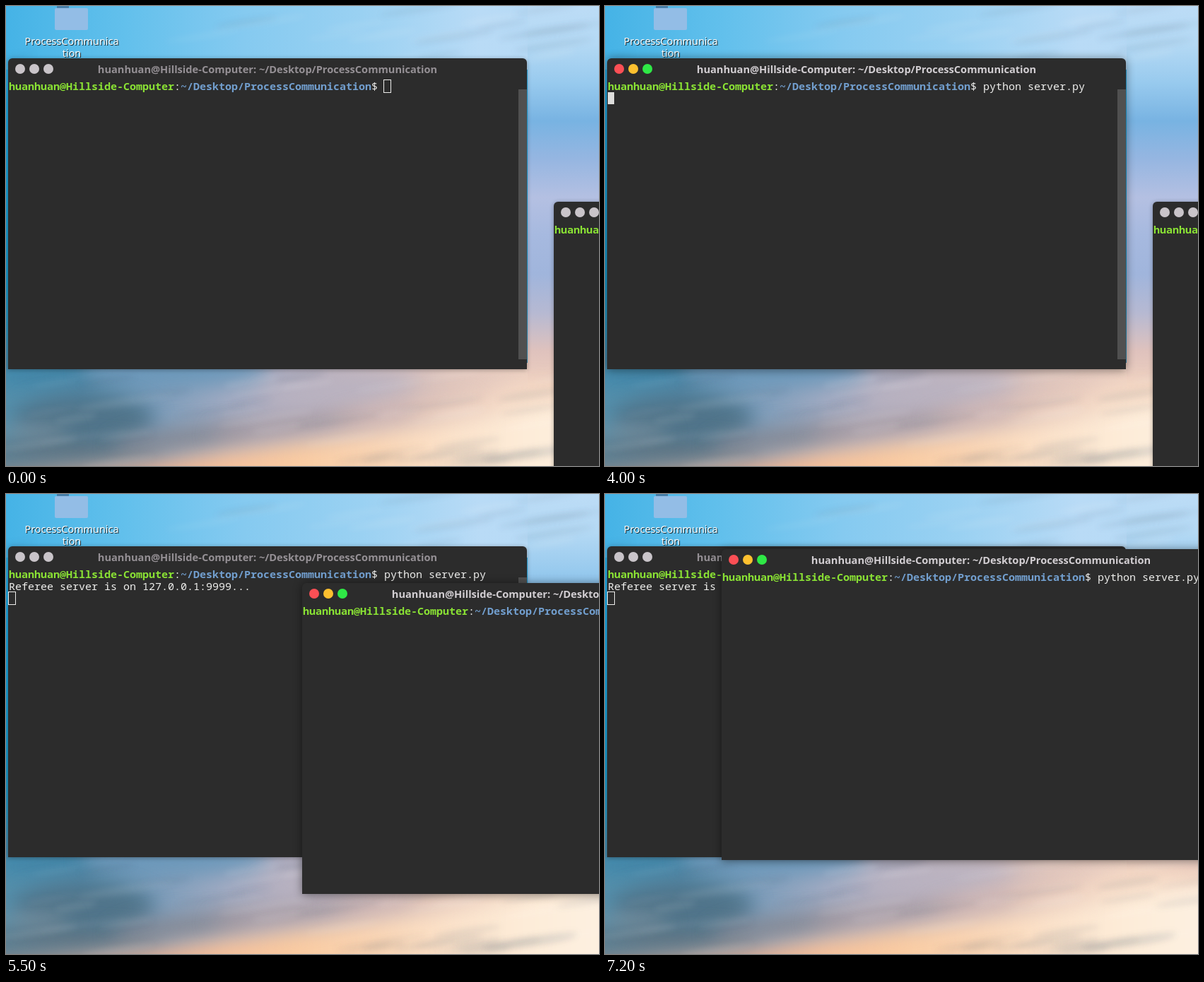
An HTML page with a canvas for the animation above (8 s loop, 839 px wide and 651 px high).

```html
<!DOCTYPE html>
<html lang="en">
<head>
<meta charset="utf-8">
<title>Two terminals</title>
<style>
html, body { margin: 0; height: 100%; overflow: hidden; }
canvas { display: block; }
</style>
</head>
<body>
<canvas id="stage" width="839" height="651"></canvas>
<script>
const W = 839, H = 651, LOOP = 8000;
const CELL = 9, LINE = 17, WIN_W = 734, WIN_H = 440;
const USER = 'huanhuan@Hillside-Computer', FOLDER = '~/Desktop/ProcessCommunication';
const COMMAND = 'python server.py', OUTPUT = 'Referee server is on 127.0.0.1:9999...';
const WHITE = '#eeeeec';
const ctx = document.getElementById('stage').getContext('2d');
const wallpaper = paintWallpaper();

function paintWallpaper() {
  const canvas = document.createElement('canvas');
  canvas.width = W;
  canvas.height = H;
  const g = canvas.getContext('2d');

  function gradient(x, y, colors) {
    const fill = g.createLinearGradient(0, 0, x, y);
    colors.split(' ').forEach((c, i, all) => fill.addColorStop(i / (all.length - 1), c));
    return fill;
  }
  function blob(x, y, rx, ry, color, tilt = 0) {
    g.fillStyle = color;
    g.beginPath();
    g.ellipse(x, y, rx, ry, tilt, 0, 7);
    g.fill();
  }

  // sky: left edge, top strip, right side
  g.fillStyle = gradient(0, H, '#3db4e6 #22a6de #1ba0d6 #1a98c8 #3f90b2 #6a8c9e');
  g.fillRect(0, 0, W, H);
  g.fillStyle = gradient(W, 0, '#45b3e6 #62c0ec #85caf0 #9ad1f2 #b9dbf6 #b4d9f5');
  g.fillRect(0, 0, W, 90);
  g.fillStyle = gradient(0, H,
    '#bcdcf6 #b4d9f4 #98caee #78b3e2 #96b6e1 #b4c0e2 #a6b9df #a0b5dc #b6b9d2 #dfc2bd #f0d2c0 #f8deca #fdeedb');
  g.fillRect(738, 0, W - 738, H);

  // clouds
  g.fillStyle = gradient(W, 0, '#5590ac #5189a8 #7a9cba #a2abc2 #b5b0c0 #c9b9be #e0c6bd #ecd0c2 #f6dcca');
  g.fillRect(0, 505, 738, H);
  g.filter = 'blur(14px)';
  blob(20, 510, 90, 30, '#4489ab');
  blob(240, 515, 130, 25, '#6c98ba');
  blob(110, 585, 100, 34, '#50748a');
  blob(40, 605, 50, 9, '#8598a4');
  blob(90, 630, 130, 14, '#5f707d');
  blob(250, 612, 100, 16, '#878a95', -.12);
  blob(400, 592, 110, 15, '#a99ca3', -.14);
  blob(470, 545, 110, 18, '#b9b2c0', -.12);
  blob(560, 575, 100, 12, '#cfb4b0', -.14);
  blob(680, 565, 110, 14, '#f2d5c3', -.1);
  blob(760, 560, 70, 26, '#f5dac6');

  // sunlit underside
  g.fillStyle = gradient(W, 0, '#8c7c78 #bd9c8e #e8b092 #f6c19a #f9cba2 #fad5b4 #fbe2ca #fdecd8 #fdf0e0');
  g.beginPath();
  g.moveTo(-30, 655);
  g.lineTo(200, 645);
  g.lineTo(300, 631);
  g.lineTo(420, 616);
  g.lineTo(520, 603);
  g.lineTo(620, 588);
  g.lineTo(720, 570);
  g.lineTo(870, 550);
  g.lineTo(870, 690);
  g.lineTo(-30, 690);
  g.fill();

  // soft brush strokes
  let seed = 7;
  const random = () => (seed = seed * 16807 % 2147483647) / 2147483647;
  g.filter = 'blur(4px)';
  for (let i = 0; i < 70; i++) {
    const x = random() * W, y = i < 20 ? random() * 80 : 520 + random() * 130;
    blob(x, y, 30 + random() * 40, 2 + random() * 4, i % 2 ? '#ffffff18' : '#30486016', -.15);
  }
  g.filter = 'none';

  // desktop folder
  g.fillStyle = '#477fa9';
  g.fillRect(72, 0, 17, 3);
  g.fillStyle = '#93bde6';
  g.beginPath();
  g.roundRect(69, 3, 47, 31, 2);
  g.fill();
  g.font = '14.4px "Noto Sans", sans-serif';
  g.textAlign = 'center';
  [['#000c', 1], ['#fff', 0]].forEach(([color, d]) => {
    g.fillStyle = color;
    g.fillText('ProcessCommunica', 93 + d, 55 + d);
    g.fillText('tion', 93 + d, 72 + d);
  });
  return canvas;
}

function monoText(str, x, y, color, weight = 400) {
  ctx.font = weight + ' 15px "Noto Sans Mono", monospace';
  ctx.textAlign = 'left';
  ctx.fillStyle = color;
  ctx.fillText(str, x, y);
}

function drawTerminal({ x, y, active, command = '', output = '', row, col, cursorOn }) {
  ctx.save();
  ctx.translate(x, y);

  ctx.shadowColor = active ? '#0007' : '#0005';
  ctx.shadowBlur = active ? 13 : 6;
  ctx.shadowOffsetY = 1;
  ctx.fillStyle = '#2c2c2c';
  ctx.beginPath();
  ctx.roundRect(0, 0, WIN_W, WIN_H, [6, 6, 0, 0]);
  ctx.fill();
  ctx.shadowColor = 'transparent';

  const buttons = active ? ['#fa4f55', '#fdc02f', '#2fe846'] : Array(3).fill('#c9c4c9');
  buttons.forEach((color, i) => {
    ctx.fillStyle = color;
    ctx.beginPath();
    ctx.arc(17 + 20 * i, 15, 7, 0, 7);
    ctx.fill();
  });
  ctx.font = 'bold 14.6px "Noto Sans", sans-serif';
  ctx.textAlign = 'center';
  ctx.fillStyle = active ? '#d2ced2' : '#959095';
  ctx.fillText(`${USER}: ${FOLDER}`, WIN_W / 2, 21);
  ctx.fillStyle = '#505050';
  ctx.fillRect(WIN_W - 12, 44, 12, 382);

  const at = n => 1 + n * CELL;
  const pathCol = USER.length + 1, endCol = pathCol + FOLDER.length;
  monoText(USER, at(0), 45, '#8ae234', 700);
  monoText(':', at(USER.length), 45, WHITE);
  monoText(FOLDER, at(pathCol), 45, '#729fcf', 700);
  monoText('$ ' + command, at(endCol), 45, WHITE);
  monoText(output, at(0), 45 + LINE, WHITE);

  const cx = at(col), cy = 31 + row * LINE;
  if (!active) {
    ctx.strokeStyle = WHITE;
    ctx.strokeRect(cx - .5, cy - .5, CELL + 1, LINE + 1);
  } else if (cursorOn) {
    ctx.fillStyle = '#dededc';
    ctx.fillRect(cx, cy, CELL, LINE);
  }
  ctx.restore();
}

// positions of the dragged window, one per 100 ms from 5200
const DRAG = [[775, 277], [725, 250], [560, 180], [419, 126], [374, 109], [345, 98],
  [326, 91], [315, 87], [240, 80], [182, 76], [168, 77], [165, 78]];
const PROMPT_END = USER.length + FOLDER.length + 3;
const within = (t, a, b) => t >= a && t < b;

function draw(t) {
  ctx.drawImage(wallpaper, 0, 0);

  const typed = t >= 2000, row = t < 4000 ? 0 : t < 4100 ? 1 : 2;
  drawTerminal({
    x: 3, y: 74,
    active: within(t, 500, 4900),
    command: typed ? COMMAND : '',
    output: row === 2 ? OUTPUT : '',
    row,
    col: row ? 0 : PROMPT_END + (typed ? COMMAND.length : 0),
    cursorOn: !(within(t, 1100, 1500) || within(t, 2600, 3200) || within(t, 4600, 4900)),
  });

  const step = Math.min(DRAG.length - 1, Math.max(0, Math.floor((t - 5200) / 100)));
  const [x, y] = DRAG[step], recalled = t >= 7200;
  drawTerminal({
    x, y,
    active: t >= 4900,
    command: recalled ? COMMAND : '',
    row: 0,
    col: PROMPT_END + (recalled ? COMMAND.length : 0),
    cursorOn: !within(t, 6600, 7100),
  });
}

function tick() {
  draw(performance.now() % LOOP);
  requestAnimationFrame(tick);
}
tick();
</script>
</body>
</html>
```
